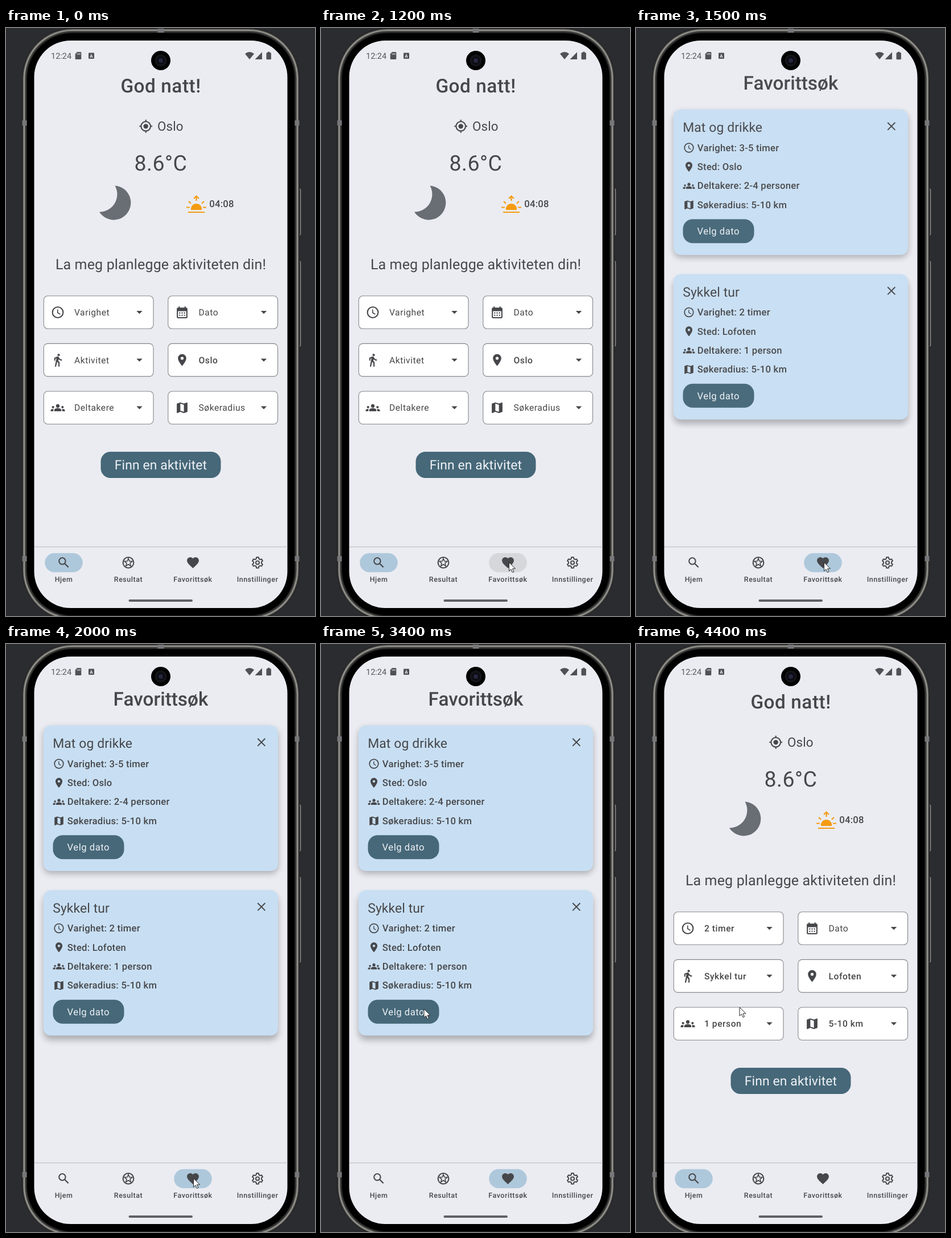
These frames come from a looping animation (543x1031 px, 5000 ms). An HTML page:

```html
<!DOCTYPE html>
<html lang="no">
<head>
<meta charset="utf-8">
<title>Aktivitetsplanlegger</title>
<style>
html, body { margin: 0; width: 100%; height: 100%; overflow: hidden; background: #2b2c30; }
svg { display: block; width: 100%; height: 100%; }
text { font-family: Roboto, sans-serif; white-space: pre; text-rendering: geometricPrecision; }
</style>
</head>
<body>
<svg id="stage" viewBox="0 0 543 1031" xmlns="http://www.w3.org/2000/svg"></svg>
<script>
const INK = '#46474a', TEAL = '#466879', SURFACE = '#ebecf2', PILL = '#aec8db', HOVER = '#d6d7db';
const LOOP = 5000, STEP = 100;

const text = (x, y, size, str, o = {}) =>
  `<text x="${x}" y="${y}" font-size="${size}" font-weight="${o.weight || 400}" letter-spacing="${o.gap || 0}"
    text-anchor="${o.mid ? 'middle' : 'start'}" fill="${o.fill || INK}" ${o.id ? `id="${o.id}"` : ''}>${str}</text>`;
const rect = (x, y, w, h, r, fill, extra = '') =>
  `<rect x="${x}" y="${y}" width="${w}" height="${h}" rx="${r}" fill="${fill}" ${extra}/>`;
const circle = (x, y, r, extra = '') => `<circle cx="${x}" cy="${y}" r="${r}" ${extra}/>`;
const path = (d, extra = '') => `<path d="${d}" ${extra}/>`;
const line = (w = 2) => `fill="none" stroke="${INK}" stroke-width="${w}"`;

// Closed polygon from [radius, degrees] pairs around the icon centre
const polar = pts => 'M' + pts.map(([r, a]) => {
  const k = a * Math.PI / 180;
  return (12 + r * Math.cos(k)).toFixed(2) + ' ' + (12 + r * Math.sin(k)).toFixed(2);
}).join('L') + 'z';
const star = polar([...Array(10).keys()].map(i => [i % 2 ? 3 : 7, i * 36 - 90]));
const gear = polar([...Array(6).keys()].flatMap(i => {
  const a = i * 60 - 90;
  return [[6.7, a - 21], [9.1, a - 11], [9.1, a + 11], [6.7, a + 21]];
}));

// 24-unit icon shapes
const icons = {
  clock: circle(12, 12, 9, line()) + path('M11.8 7v5.6l4.4 2.6', line(1.6)),
  pin: path('M12 2C8.13 2 5 5.13 5 9c0 5.25 7 13 7 13s7-7.75 7-13c0-3.87-3.13-7-7-7zm0 9.5a2.5 2.5 0 0 1 0-5 2.5 2.5 0 0 1 0 5z', 'fill-rule="evenodd"'),
  heart: path('M12 21.35l-1.45-1.32C5.4 15.36 2 12.28 2 8.5 2 5.42 4.42 3 7.5 3c1.74 0 3.41.81 4.5 2.09C13.09 3.81 14.76 3 16.5 3 19.58 3 22 5.42 22 8.5c0 3.78-3.4 6.86-8.55 11.54z'),
  search: circle(9.5, 9.5, 5.5, line()) + path('M13.8 13.8l6 6', line(2.2)),
  close: path('M5.7 5.7L18.3 18.3M18.3 5.7L5.7 18.3', line(1.9)),
  group: circle(12, 9, 3) + circle(4, 11, 2) + circle(20, 11, 2) +
    path('M6 18v-1.6q0-2 1.8-2.75 4.2-1.8 8.4 0 1.8.75 1.8 2.75V18zM0 18v-1.6q0-1.3 1.2-1.8 2-.8 3.9-.5-.6 1-.6 2.3V18zM24 18v-1.6q0-1.3-1.2-1.8-2-.8-3.9-.5.6 1 .6 2.3V18z'),
  map: path('M20.5 3L15 5.1 9 3 3.4 4.9q-.4.1-.4.5V20.5q0 .5.6.5L9 18.9l6 2.1 5.6-1.9q.4-.1.4-.5V3.5q0-.5-.5-.5zM15 19l-6-2.11V5l6 2.11z', 'fill-rule="evenodd"'),
  calendar: path('M19 4h-1V2h-2v2H8V2H6v2H5a2 2 0 0 0-2 2v14a2 2 0 0 0 2 2h14a2 2 0 0 0 2-2V6a2 2 0 0 0-2-2zm0 16H5V10h14z', 'fill-rule="evenodd"') +
    path('M7 13h10M7 17h10', line() + ' stroke-dasharray="2"'),
  walk: path('M9.8 8.9L7 23h2.1l1.8-8 2.1 2v6h2v-7.5l-2.1-2 .6-3C14.8 12 16.8 13 19 13v-2c-1.9 0-3.5-1-4.3-2.4l-1-1.6c-.4-.6-1-1-1.7-1-.3 0-.5.1-.8.1L6 8.3V13h2V9.6z') + circle(13.5, 3.5, 2),
  drop: path('M7 10l5 5 5-5z'),
  target: circle(12, 12, 4) + circle(12, 12, 8, line()) + path('M12 1v3M12 20v3M1 12h3M20 12h3', line()),
  star: circle(12, 12, 9, line()) + path(star, line(1.5)),
  gear: path(gear, line(1.9) + ' stroke-linejoin="round"') + circle(12, 12, 2.9, line(1.9))
};
const icon = (name, x, y, size = 25) =>
  `<g transform="translate(${x - size / 2} ${y - size / 2}) scale(${size / 24})" fill="${INK}">${icons[name]}</g>`;

// icon, initial label, chosen label
const fields = [
  ['clock', 'Varighet', '2 timer'], ['calendar', 'Dato', 'Dato'],
  ['walk', 'Aktivitet', 'Sykkel tur'], ['pin', 'Oslo', 'Lofoten'],
  ['group', 'Deltakere', '1 person'], ['map', 'Søkeradius', '5-10 km']
];
const tabs = [['search', 'Hjem'], ['star', 'Resultat'], ['heart', 'Favorittsøk'], ['gear', 'Innstillinger']];
const tabX = i => 101.5 + i * 113.5;

// The body is centred on the screen, so its lower edge lies below the stage
const rim = (inset, fill, extra) =>
  rect(28.5 + inset, .5 + inset, 487 - 2 * inset, 1038 - 2 * inset, 88 - inset, fill, extra);

function phone() {
  const buttons = [[282, 81], [409, 149]].map(([y, h]) =>
    rect(512.5, y, 5.2, h, 2, '#3a3a3a', 'stroke="#a9a7a3" stroke-width="1"')).join('');
  const bands = [166, 930].map(y => rect(28.5, y - 4, 8, 9, 0, '#77777a') + rect(507.5, y - 4, 8, 9, 0, '#77777a')).join('');
  return buttons + rim(0, '#454442', 'stroke="#1c1c1e" stroke-width="1"') +
    rim(3.4, '#4a4947', 'stroke="#96948f" stroke-width="2.4"') + rim(6.5, '#242424') + bands +
    rect(266.5, 1, 11, 7, 0, '#77777a') + rim(8.5, '#000') + rect(49.5, 22, 445, 995, 64, SURFACE);
}

function statusBar() {
  return text(79, 54, 14.5, '12:24', { fill: '#55565a' }) +
    `<g fill="#505155">${path('M125 42h6q1.3 0 1.3 1.3v10.4q0 1.3-1.3 1.3h-8q-1.3 0-1.3-1.3V45.5z')}` +
    path('M125.3 44.5v2.5M127.6 44v3M129.9 44v3', `stroke="${SURFACE}" stroke-width="1"`) +
    rect(145, 43.5, 10, 10.5, 1.3, '#505155') +
    path('M428 55L420 45.2Q428 38.6 436 45.2zM437.5 55L450 42.3V55z') +
    path('M459.7 41.8h4v1.4h1q1.2 0 1.2 1.2v9.6q0 1.2-1.2 1.2h-6q-1.2 0-1.2-1.2v-9.6q0-1.2 1.2-1.2h1z') + '</g>' +
    text(150, 52, 8, 'A', { mid: 1, weight: 700, fill: SURFACE }) +
    circle(272, 57, 17, 'fill="#020203"') + circle(272, 57, 10.5, 'fill="#14141a"') +
    circle(272, 57, 7, 'fill="#0b0b12"') + circle(272, 57, 4, 'fill="#25263c"');
}

function home() {
  const sun = '#f59b10';
  const boxes = fields.map(([name], i) => {
    const x = i % 2 ? 284.8 : 66.3, y = 469.8 + (i >> 1) * 83.6;
    return rect(x, y, 192.7, 57.5, 7, '#fff', 'stroke="#85868a" stroke-width="1.1"') +
      icon(name, x + 24.7, y + 28.8) + text(x + 53.7, y + 34.4, 15.63, '', { gap: .52, id: 'field' + i }) +
      icon('drop', x + 168.2, y + 28.4);
  }).join('');
  return text(272, 112.5, 33.34, 'God natt!', { gap: .52, weight: 500, mid: 1 }) +
    icon('target', 245.7, 172.3) + text(266, 180, 22.4, 'Oslo', { gap: .156 }) +
    text(272, 250, 37.5, '8.6°C', { gap: .52, mid: 1 }) +
    path('M191.5 276.5A30 30 0 1 1 164 322.5A31 31 0 0 0 191.5 276.5z', 'fill="#696e74"') +
    path('M325 319a9.6 9.6 0 1 1 19 0z', `fill="${sun}"`) +
    path('M320 323h29M317 314.5h6M346 314.5h6M321 304l4 3.6M348 304l-4 3.6M334.5 303v-7M330 299l4.5-4.3 4.5 4.3', `fill="none" stroke="${sun}" stroke-width="2.2"`) +
    text(357.3, 313.8, 16.67, '04:08', { gap: .24, weight: 500 }) +
    text(272, 422.5, 25, 'La meg planlegge aktiviteten din!', { gap: .156, mid: 1 }) + boxes +
    rect(166.5, 743, 211, 46, 17, TEAL) +
    text(272, 773.7, 22.92, 'Finn en aktivitet', { gap: .1, mid: 1, fill: '#eef1f5' });
}

function card(y, title, time, place, people) {
  const rows = [['clock', 'Varighet: ' + time], ['pin', 'Sted: ' + place], ['group', 'Deltakere: ' + people], ['map', 'Søkeradius: 5-10 km']];
  // Light falls from the top of the screen: the shadow drops further on lower cards
  return rect(66, y + 3 + y / 90, 412, 255, 13, '#000', 'opacity=".27" filter="url(#blur)"') +
    rect(66, y, 412, 255, 13, '#c8dff3') +
    text(82.2, y + 39, 22.92, title, { gap: .1 }) + icon('close', 448.8, y + 29.3) +
    rows.map(([name, label], i) => icon(name, 93, y + 67 + i * 33.4, 20.8) +
      text(107.8, y + 72.6 + i * 33.4, 16.67, label, { gap: .24, weight: 500 })).join('') +
    rect(82.5, y + 192.2, 125, 42, 17, TEAL) +
    text(107.6, y + 219, 16.67, 'Velg dato', { gap: .52, fill: '#eef1f5' });
}

const favorites = () =>
  text(272, 107.8, 33.34, 'Favorittsøk', { weight: 500, mid: 1 }) +
  card(143, 'Mat og drikke', '3-5 timer', 'Oslo', '2-4 personer') +
  card(431.5, 'Sykkel tur', '2 timer', 'Lofoten', '1 person');

const navBar = () => rect(50, 909, 444.5, 1.3, 0, '#c3c4ca') +
  tabs.map(([name, label], i) => rect(tabX(i) - 33.3, 920.8, 66.6, 33.4, 16.7, PILL, `id="pill${i}"`) +
    icon(name, tabX(i), 937.4) + text(tabX(i), 970.8, 12.5, label, { gap: .52, weight: 500, mid: 1 })).join('') +
  rect(215.5, 1002, 112.5, 4, 2, '#5f6064');

const stage = document.getElementById('stage');
stage.innerHTML = `<defs><filter id="blur" x="-10%" y="-15%" width="120%" height="130%">
  <feGaussianBlur stdDeviation="6"/></filter></defs>` +
  phone() + `<g id="favorites">${favorites()}</g><g id="home">${home()}</g>` + navBar() + statusBar() +
  path('M0 0V15.2L3.5 11.9L6 17.6L8.5 16.5L6 11H11z', 'id="cursor" fill="#fff" stroke="#222" stroke-width="1" stroke-linejoin="round"');

const $ = id => document.getElementById(id);
const clamp = v => Math.max(0, Math.min(1, v));
const mix = (a, b, p) => a + (b - a) * p;
const easeOut = p => 1 - (1 - p) ** 3;
const easeBoth = p => p * p * (3 - 2 * p);

function cursorAt(t) {
  if (t < 100) return null;
  if (t < 2000) {
    const p = easeOut(clamp((t - 100) / 500));
    return [mix(536, 330.5, p), mix(978, 937, p)];
  }
  if (t < 3800) {
    const p = easeBoth(clamp((t - 2000) / 400));
    return [mix(329.5, 181, p), mix(937, 640, p)];
  }
  return [182, 637];
}

function render(time) {
  const t = Math.floor(time % LOOP / STEP) * STEP;
  const chosen = t >= 3800, onFavorites = t >= 1300 && !chosen;
  const rest = onFavorites ? .09 * clamp(1 - (t - 1300) / 400) ** 2 : 1;

  $('favorites').setAttribute('opacity', onFavorites ? 1 - rest : 0);
  $('home').setAttribute('opacity', onFavorites ? rest * .12 : 1);

  fields.forEach(([, before, after], i) => {
    const el = $('field' + i);
    el.textContent = chosen ? after : before;
    el.setAttribute('font-weight', i === 3 || chosen && i !== 1 ? 500 : 400);
  });

  const pos = cursorAt(t), active = onFavorites ? 2 : 0;
  tabs.forEach((_, i) => {
    const over = pos && pos[1] > 910 && Math.abs(pos[0] - tabX(i)) < 52;
    $('pill' + i).setAttribute('fill', i === active ? PILL : over ? HOVER : 'none');
  });
  $('cursor').setAttribute('visibility', pos ? 'visible' : 'hidden');
  if (pos) $('cursor').setAttribute('transform', `translate(${pos[0]} ${pos[1]})`);
}

const start = performance.now();
(function tick() {
  render(performance.now() - start);
  requestAnimationFrame(tick);
})();
</script>
</body>
</html>
```
